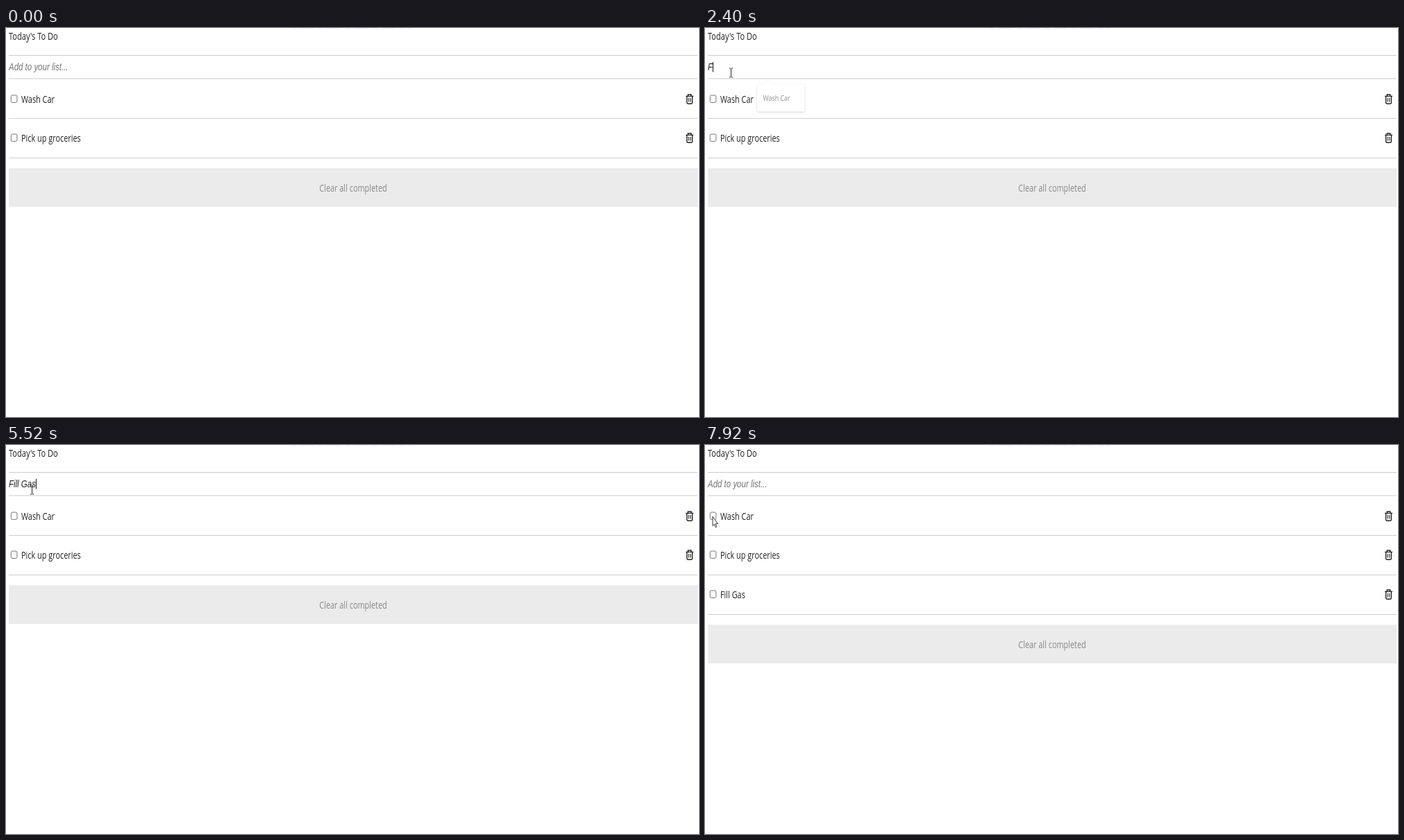
An HTML page for the animation above (8000 ms loop, 998 by 561 pixels).

```html
<!DOCTYPE html>
<html lang="en">
<head>
<meta charset="utf-8">
<title>To-do list</title>
<style>
  html, body { margin: 0; width: 100%; height: 100%; overflow: hidden; background: #fff; }
  svg { display: block; width: 998px; height: 561px; }
  text { font: 14px "Open Sans", "Noto Sans", sans-serif; fill: #222; white-space: pre; }
  .field { font: italic 14.2px "Liberation Sans", Arial, sans-serif; }
  .hint { fill: #757575; }
  .small { font-size: 11.4px; }
  .rule { stroke: #ccc; }
  #popup { filter: drop-shadow(0 1px 1.5px #0005); }
</style>
</head>
<body>
<svg viewBox="0 0 998 561">
  <defs>
    <g id="row">
      <rect x="7.3" y="97" width="8.6" height="10.4" rx="1.8" fill="#fff" stroke="#767676"/>
      <g fill="none" stroke="#222" stroke-width="1.4">
        <path d="M979 98.4H990M982.2 98V96H986.8V98M980.6 98.5V107.6Q980.6 109.2 982 109.2H987Q988.4 109.2 988.4 107.6V98.5"/>
        <path d="M983.2 101V106.6M985.8 101V106.6" stroke-width="1.1"/>
      </g>
    </g>
  </defs>

  <path d="M410 .3H585" stroke="#eee" stroke-dasharray="9 3 22 5"/>
  <path class="rule" d="M4 39.5H996M4 73H996"/>
  <text transform="translate(4 16.5) scale(.778 1)" style="font-size:14.2px">Today's To Do</text>
  <text id="input" class="field" transform="translate(4 61) scale(.809 1)"></text>
  <g id="rows"></g>
  <g id="clear">
    <rect x="4" y="202.3" width="992" height="55.7" fill="#ebebeb"/>
    <text transform="translate(500 235.7) scale(.778 1)" text-anchor="middle" style="fill:#888">Clear all completed</text>
  </g>
  <g id="popup">
    <path d="M77 81.5H84.5L91 75L97.5 81.5H141.5Q143.5 81.5 143.5 83.5V118.5Q143.5 120.5 141.5 120.5H77Q75 120.5 75 118.5V83.5Q75 81.5 77 81.5Z" fill="#fff"/>
    <text class="small" transform="translate(83.5 105.2) scale(.778 1)">Wash Car</text>
  </g>
  <path id="caret" d="M0 49V63.5" stroke="#111"/>
  <path id="beam" d="M-2.5 -6.5H-.6M.6 -6.5H2.5M0 -6V6M-2.5 6.5H-.6M.6 6.5H2.5" fill="none" stroke="#222"/>
  <path id="arrow" d="M0 0V13.5L2.4 11.2L4.1 15.7L5.9 14.8L4.2 10.5H7.4Z" fill="#fff" stroke="#222" stroke-width=".9"/>
</svg>
<script>
const $ = id => document.getElementById(id);
const LOOP = 8000, STEP = 80, BLINK = 500, PITCH = 57;
const ENTER = 160, FOCUS = 760, SUBMIT = 5560, ADDED = 5680, LEAVE = 6480, BLUR = 7880;
// Each word is typed at its own steady pace.
const bursts = [
  { text: "Fill ", start: 2320, gap: 240 },
  { text: "Gas", start: 3840, gap: 310 }
];
const TASK = bursts.map(b => b.text).join("");

// Text and icons sit on whole pixels, so their offsets round down.
$("rows").innerHTML = ["Wash Car", "Pick up groceries", TASK].map((label, i) =>
  `<g><g transform="translate(0 ${Math.floor(i * 56.6)})"><use href="#row"/>
   <text transform="translate(22 108) scale(.778 1)">${label}</text></g>
   <path class="rule" d="M4 ${130.4 + i * PITCH}H996"/></g>`).join("");

const progress = (t, from, to) => Math.max(0, Math.min(1, (t - from) / (to - from)));
const lerp = (a, b, k) => a + (b - a) * k;
const bend = (a, b, c, k) => lerp(lerp(a, b, k), lerp(b, c, k), k);
const show = (el, on) => el.setAttribute("visibility", on ? "visible" : "hidden");
const move = (el, x, y) => el.setAttribute("transform", `translate(${x} ${y})`);

const typedCount = ({ text, start, gap }, t) =>
  t < start ? 0 : Math.min(text.length, Math.floor((t - start) / gap) + 1);

function caretOn(t) {
  if (t < FOCUS || t >= BLUR) return false;
  let reset = FOCUS;
  for (const b of bursts) {
    const n = typedCount(b, t);
    if (n) reset = b.start + (n - 1) * b.gap;
  }
  if (t >= SUBMIT) reset = SUBMIT;
  return (t - reset) % (2 * BLINK) < BLINK;
}

function pointerAt(t) {
  if (t < LEAVE) {
    const k = progress(t, ENTER, 480);
    return [lerp(62, 37.5, k), lerp(57, 64.5, k)];
  }
  const k = progress(t, LEAVE, 7360);
  return [bend(37.5, 69, 11, k), bend(64.5, 85, 109, k) - 6 * progress(t, 7600, 7920)];
}

function draw(t) {
  const added = t >= ADDED;
  const typed = added ? "" : bursts.map(b => b.text.slice(0, typedCount(b, t))).join("");
  const input = $("input");
  input.textContent = typed || "Add to your list...";
  input.classList.toggle("hint", !typed);

  show($("rows").lastElementChild, added);
  move($("clear"), 0, added ? PITCH : 0);
  $("popup").setAttribute("opacity", progress(t, 480, 800) * (1 - progress(t, 2240, 2560)));

  show($("caret"), caretOn(t));
  move($("caret"), 4.5 + (typed ? input.getComputedTextLength() * .809 : 0), 0);

  const [x, y] = pointerAt(t), inField = y < 73;
  show($("beam"), t >= ENTER && inField);
  show($("arrow"), t >= ENTER && !inField);
  move($("beam"), x, y);
  move($("arrow"), x, y);
}

function frame(now) {
  draw(Math.floor(now % LOOP / STEP) * STEP);
  requestAnimationFrame(frame);
}
requestAnimationFrame(frame);
</script>
</body>
</html>
```
